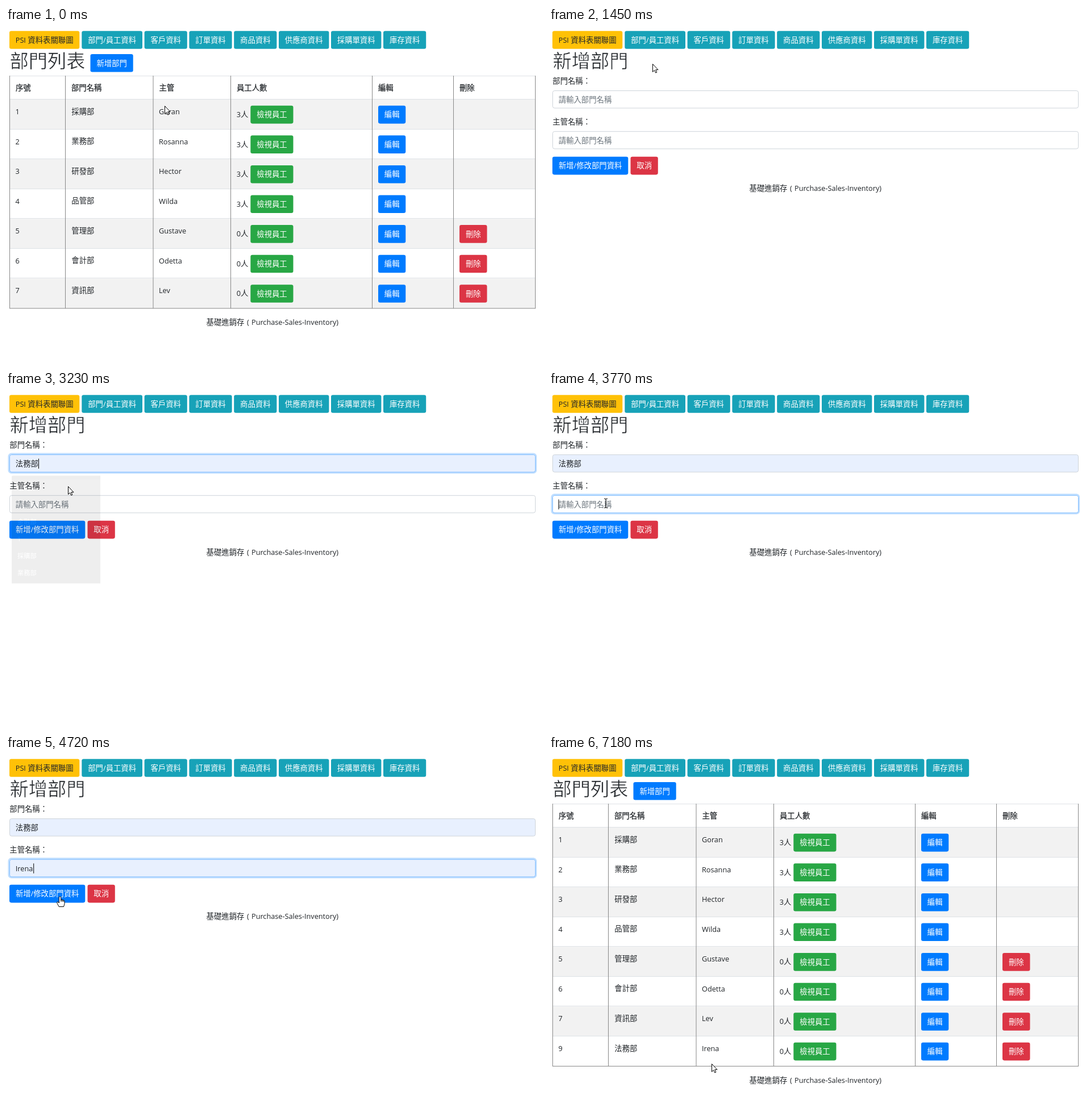
An HTML page that plays this animation: 945 px wide and 592 px high, repeating every 7510 ms.

```html
<!DOCTYPE html>
<html lang="zh-Hant">
<head>
<meta charset="utf-8">
<title>PSI</title>
<style>
html, body { margin: 0; width: 100%; height: 100%; overflow: hidden; background: #fff; }
svg { display: block; width: 945px; height: 592px; }
text { font-family: "Open Sans", "Noto Sans CJK TC", "Noto Sans CJK", sans-serif; white-space: pre; }
.title { font-weight: 300; stroke: #fff; stroke-width: .6px; }
.head { stroke: #212529; stroke-width: .25px; }
.popup { filter: drop-shadow(0 1px 1.5px rgba(0,0,0,.4)); }
.leaving { filter: none; clip-path: inset(0 4px 4px 0); }
</style>
</head>
<body>
<svg id="stage" viewBox="0 0 945 592"></svg>
<script>
const LOOP = 7510, EM = 13.36, ROW = 52.57, BTN_H = 31.6;
const INK = '#212529', BLUE = '#007bff', BLUE_HOVER = '#0069d9', BLUE_DOWN = '#0062cc';
const TEAL = '#17a2b8', GREEN = '#28a745', RED = '#dc3545', PALE = '#e8f0fe';
const stage = document.getElementById('stage');

const NAV = [['PSI 資料表關聯圖', 6, 123.3], ['部門/員工資料', 133.3, 106.7], ['客戶資料', 243.6, 75.2],
  ['訂單資料', 322.4, 75.2], ['商品資料', 401.2, 75.2], ['供應商資料', 480, 88.4], ['採購單資料', 572, 88.4], ['庫存資料', 664, 75.2]];
const COLS = [6.5, 104.5, 259, 395.5, 644.5, 787.5, 931.5];
const HEADS = ['序號', '部門名稱', '主管', '員工人數', '編輯', '刪除'];
const STAFF = [['採購部', 'Goran'], ['業務部', 'Rosanna'], ['研發部', 'Hector'], ['品管部', 'Wilda'],
  ['管理部', 'Gustave'], ['會計部', 'Odetta'], ['資訊部', 'Lev'], ['法務部', 'Irena']];
const DEPT_HINTS = ['法務部', 'Quentin', '金融部', '1', '採購部', '業務部'];
const NAME_HINTS = ['Irena', 'Ewald', 'Ewal', 'Goran', 'Rosanna', 'Hector'];

// Pointer moves: first step, last step, number of steps, destination
const MOVES = [
  [620, 920, 5, 182, 63], [1940, 2400, 7, 128, 128], [2553, 2700, 3, 123, 142],
  [2770, 3000, 4, 109, 166], [3310, 3390, 2, 100, 178], [3460, 3620, 3, 100, 196],
  [3925, 4090, 3, 97, 234], [4220, 4330, 2, 95, 243], [4560, 4720, 3, 95, 247],
  [6180, 6490, 5, 372, 420], [6570, 6880, 5, 317, 534], [6950, 7180, 4, 286, 542]];
const POINTERS = {
  arrow: '<path d="M.5.5V14.3L3.6 11.4 5.7 16 7.8 15.1 5.8 10.6H10Z"/>',
  hand: '<path d="M-1.6 1.6Q0-.6 1.6 1.6V6L6.2 7Q8 7.5 8 9.5V13.5L6.5 18.5H-1.8L-5 12.4Q-6 9.6-3.8 9.8L-1.6 12Z"/><path d="M1.6 6V9.5M3.8 6.6V9.8M6 7V10"/>',
  beam: '<path d="M-3-8H-1L0-7 1-8H3M0-7V7M-3 8H-1L0 7 1 8H3" fill="none"/>'
};

// Last value whose start time has passed: at(t, time, value, time, value, ...)
function at(t, ...keys) {
  let value = keys[1];
  for (let i = 0; i < keys.length; i += 2) if (t >= keys[i]) value = keys[i + 1];
  return value;
}
const during = (t, from, to) => t >= from && t < to;

function rect(x, y, w, h, fill, r = 0, extra = '') {
  return `<rect x="${x}" y="${y}" width="${w}" height="${h}" rx="${r}" fill="${fill}" ${extra}/>`;
}
function line(x1, y1, x2, y2, color) {
  return `<path d="M${x1} ${y1}L${x2} ${y2}" stroke="${color}"/>`;
}
// y is the middle of the line of text
function text(x, y, s, { size = EM, fill = INK, extra = '' } = {}) {
  const mixed = s.replace(/[!-~]+/g, '<tspan font-size="0.95em">$&</tspan>');
  return `<text x="${x}" y="${y + size * .37}" font-size="${size}" fill="${fill}" ${extra}>${mixed}</text>`;
}
function button(x, y, w, label, color, ink = '#fff') {
  return rect(x, y, w, BTN_H, color, 3.3) +
    text(x + w / 2, y + 15.6, label, { fill: ink, extra: 'text-anchor="middle"' });
}
function title(s) {
  return text(6.6, 57.7, s, { size: 33.2, extra: 'class="title"' });
}
function footer(y) {
  return text(352.6, y, '基礎進銷存') + text(424, y, '(') + text(432, y, 'Purchase-Sales-Inventory)');
}

function listPage(count, addColor) {
  const bottom = 126 + count * ROW;
  let out = title('部門列表') + button(148.5, 46, 75.2, '新增部門', addColor);
  HEADS.forEach((h, i) => out += text(COLS[i] + 10.5, 105, h, { extra: 'class="head"' }));
  for (let i = 0; i < count; i++) {
    const y = 126 + i * ROW, [dept, boss] = STAFF[i];
    if (i % 2 == 0) out += rect(6.5, y, 925, ROW, '#f2f2f2');
    out += line(6, Math.round(y) - .5, 932, Math.round(y) - .5, '#dee2e6') +
      text(16.5, y + 21, `${i < 7 ? i + 1 : 9}`) + text(115.3, y + 20.7, dept) + text(269, y + 21, boss) +
      text(405.8, y + 26, (i < 4 ? 3 : 0) + '人') +
      button(430.3, y + 10.8, 75.2, '檢視員工', GREEN) + button(655, y + 10.8, 48.3, '編輯', BLUE);
    if (i > 3) out += button(798, y + 10.8, 48.5, '刪除', RED);
  }
  out += line(6, 84.5, 932, 84.5, '#dee2e6') + line(6, 125.5, 932, 125.5, '#dee2e6');
  for (const x of COLS) out += line(x, 84, x, bottom, '#888');
  return out + line(6, bottom, 932, bottom, '#888') + footer(bottom + 24.2);
}

function field(y, { value, preview, focus, caret }) {
  let out = focus ? rect(4.9, y - 1.2, 927.8, 33.6, 'none', 4.5, 'stroke="#bfdeff" stroke-width="2.8"') : '';
  out += rect(6.5, y + .5, 925, 30.6, value || preview ? PALE : '#fff', 3.3,
    `stroke="${focus ? '#80bdff' : '#ced4da'}"`);
  if (value) out += text(16.8, y + 16.5, value);
  else if (preview) out += text(16.8, y + 17, preview, { size: 11.6, fill: '#000' });
  else out += text(16.8, y + 16.5, '請輸入部門名稱', { fill: '#6c757d' });
  return caret ? out + rect(caret, y + 7.5, 1, 17.5, '#000') : out;
}

function popup(y, items, hover, opacity) {
  if (!opacity) return '';
  const leaving = opacity < .1;
  let out = rect(6, y, 160, 194, '#292a2d', 2.5);
  if (hover) out += rect(6, y + 6.5, 160, 30, '#3f4042');
  items.forEach((s, i) => out += text(16, y + 21.5 + i * 30, s, { size: 11.3, fill: '#fff' }));
  return `<g class="popup ${leaving ? 'leaving' : ''}" opacity="${opacity}"
    ${leaving ? 'transform="translate(4 5)"' : ''}>${out}</g>`;
}

function formPage(t) {
  const dept = {
    value: t >= 3080 && '法務部',
    preview: during(t, 2770, 3080) && '法務部',
    focus: during(t, 2400, 3770),
    caret: at(t, 0, 0, 2400, 16.5, 2930, 0, 3080, 57, 3600, 0)
  };
  const boss = {
    value: t >= 4480 && 'Irena',
    preview: during(t, 4007, 4480) && 'Irena',
    focus: during(t, 3770, 5430),
    caret: at(t, 0, 0, 3770, 16.5, 4330, 0, 4480, 48.2, 5100, 0)
  };
  const save = at(t, 0, BLUE, 4790, BLUE_HOVER, 5430, BLUE_DOWN, 5570, BLUE_HOVER);
  const ring = t >= 5430 ? rect(4.7, 225.7, 135.9, 34.2, 'none', 4.5, 'stroke="#93c7ff" stroke-width="2.7"') : '';
  return title('新增部門') + text(6.3, 93.5, '部門名稱：') + field(110, dept) +
    text(6.3, 165.3, '主管名稱：') + field(181.8, boss) + ring +
    button(6, 226.8, 133.3, '新增/修改部門資料', save) + button(143.5, 226.8, 48.3, '取消', RED) + footer(282.2) +
    popup(142.3, DEPT_HINTS, t >= 2770, at(t, 0, 0, 2477, .4, 2553, 1, 3155, .5, 3230, .08, 3310, 0)) +
    popup(214.2, NAME_HINTS, t >= 4007, at(t, 0, 0, 3850, .5, 3925, 1, 4480, .7, 4560, .4, 4640, .08, 4720, 0));
}

function pointer(t) {
  let x = 279, y = 137;
  for (const [from, to, steps, toX, toY] of MOVES) {
    if (t < from) break;
    const done = Math.min(steps, Math.floor((t - from) / (to - from) * (steps - 1) + 1e-6) + 1) / steps;
    x += (toX - x) * done;
    y += (toY - y) * done;
  }
  const kind = at(t, 0, 'arrow', 920, 'hand', 1450, 'arrow', 2323, 'beam', 2630, 'arrow',
    3460, 'beam', 4007, 'arrow', 4720, 'hand', 5720, 'arrow');
  return `<g transform="translate(${x} ${y})" fill="#fff" stroke="#000" stroke-linejoin="round">${POINTERS[kind]}</g>`;
}

const nav = NAV.map(([s, x, w], i) => button(x, 5.2, w, s, i ? TEAL : '#ffc107', i ? '#fff' : INK)).join('');
let shown = '';

function draw(now) {
  const t = now % LOOP;
  const page = during(t, 1375, 5720) ? formPage(t)
    : listPage(t < 1375 ? 7 : 8, t < 1375 ? at(t, 0, BLUE, 920, BLUE_HOVER, 1300, BLUE_DOWN) : BLUE);
  const picture = nav + page + pointer(t);
  if (picture !== shown) stage.innerHTML = shown = picture;
}

const start = performance.now();
function tick() {
  draw(performance.now() - start);
  requestAnimationFrame(tick);
}
tick();
</script>
</body>
</html>
```
